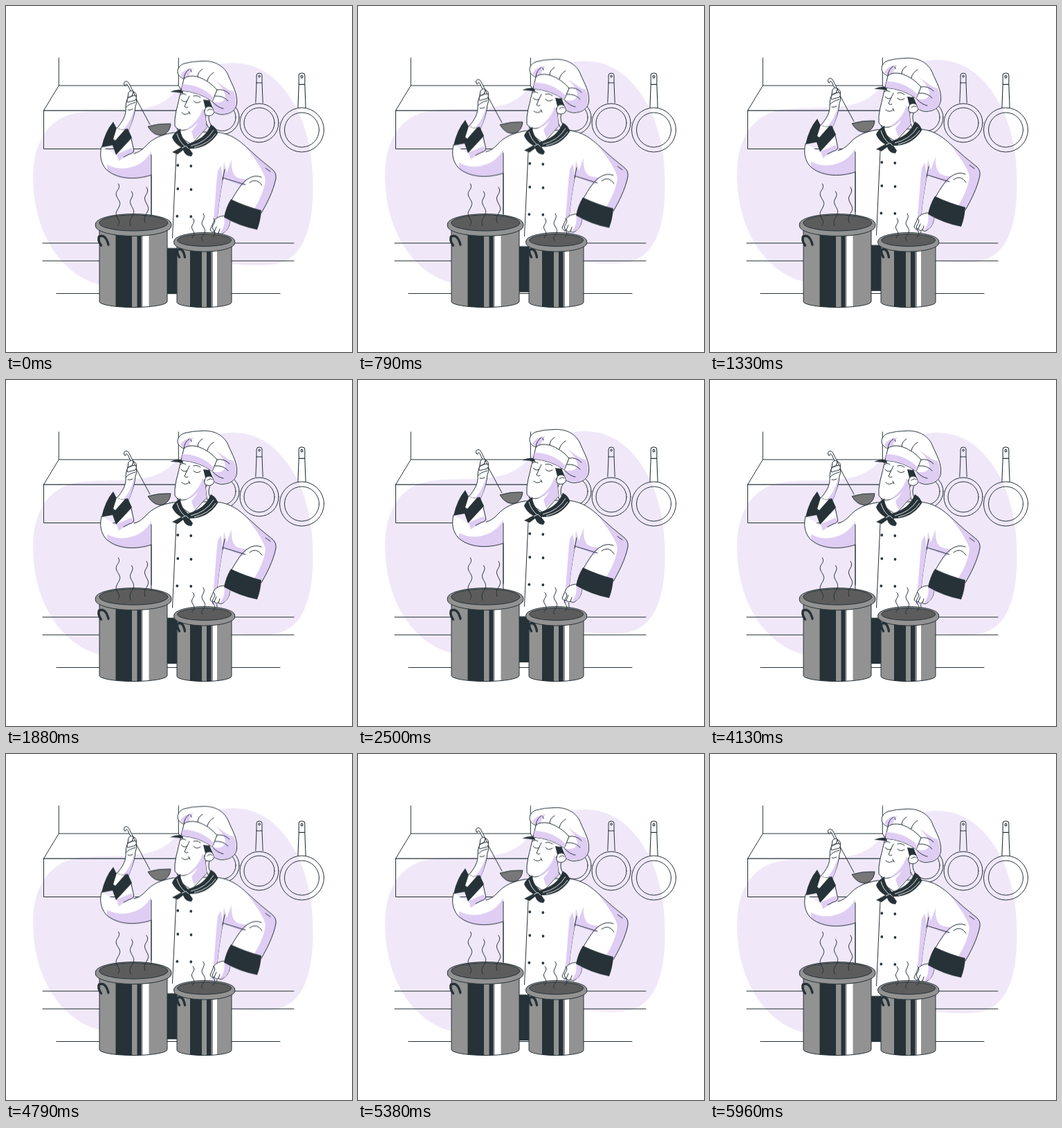
Recreate the animation shown at these times as an HTML page without scripts. Size 500x500 px, loop 6000 ms.

```html
<!DOCTYPE html>
<html lang="en">
<head>
<meta charset="utf-8">
<title>Chef tasting soup</title>
<style>
  html, body { margin: 0; width: 100%; height: 100%; overflow: hidden; background: #fff; }
  svg { display: block; width: 100vw; height: 100vh; }
  .bob { animation: bob 3s linear infinite alternate; }
  @keyframes bob { from { transform: translateY(.2px); } to { transform: translateY(-9.6px); } }
  .ln { fill: none; stroke: #263238; stroke-width: 1; stroke-linecap: round; stroke-linejoin: round; }
  .wh { fill: #fff; stroke: #263238; stroke-width: 1; stroke-linecap: round; stroke-linejoin: round; }
  .dk { fill: #263238; }
  .sh { fill: #dfcdf4; }
  .blob { fill: #f0e8f9; }
  .steel { fill: #929292; stroke: #263238; }
  .soup { fill: #5c5c5c; stroke: #263238; }
  .grip { fill: none; stroke: #263238; stroke-width: 3.4; stroke-linecap: round; }
  .trim { fill: none; stroke: #fff; stroke-width: .9; }
</style>
</head>
<body>
<svg viewBox="0 0 500 500">
  <defs>
    <clipPath id="big"><path d="M135 318V427A49 8.500 0 0 0 233 427V318Z"/></clipPath>
    <clipPath id="small"><path d="M247 342V428A39.500 7.500 0 0 0 326 428V342Z"/></clipPath>
    <g id="handle" class="ln">
      <path d="M-4 14V3Q-4 0 0 0T4 3V14L5.200 43M-4 14L-5.200 43M-4 14H4"/>
      <circle cy="4.500" r="1.400"/>
    </g>
    <circle id="button" class="dk" r="1.900"/>
  </defs>

  <g class="bob">
    <path class="blob" d="M328 82C375 82 404 116 421 150C437 182 444 222 443.500 262C443.500 325 428 369 384 373.500C345 378 318 366 284 378C240 394 190 408 146 404C94 399 39 342 39 246C39 205 55 171 87 158.500C124 145 176 158 217 143C245 132 250 112 274 98Q299 82 328 82Z"/>
  </g>

  <!-- kitchen -->
  <g class="ln">
    <path d="M53 342.700H416M53 368.300H416M73 415.500H396"/>
    <path d="M76.300 75V115H249.300V75M76.300 115L54.500 151M54.500 151V206.500H271V151L249.300 115"/>
    <path d="M54.500 151.200H271" stroke-width="1.300"/>
    <circle cx="312.500" cy="161" r="24.500"/><circle cx="312.500" cy="161" r="19.500"/>
    <circle cx="366" cy="169" r="28"/><circle cx="366" cy="169" r="22"/>
    <circle cx="427.500" cy="179" r="32"/><circle cx="427.500" cy="179" r="25"/>
  </g>
  <use href="#handle" x="366" y="97"/>
  <use href="#handle" transform="translate(427.500 97) scale(1.080 1.170)"/>

  <g class="bob">
    <!-- trousers and torso -->
    <path class="dk" d="M231 349H292V416H231Z"/>
    <path class="wh" d="M241 183C226 186 215 190 210 197V350H307C301 322 307 285 313 251L322 222L306 182Z"/>
    <path class="sh" d="M314 225L313 251C308 283 304 307 305 330H297C302 300 303 262 306 238Z"/>

    <!-- bent arm -->
    <path fill="#fff" d="M304 182C325 184 337 194 350 206Q367 222 385 236Q391 241 390 249C386 268 377 285 369 299L325 281C334 269 340 260 346 257L313 248Z"/>
    <path class="sh" d="M313 248L315 225L319 241L326 222Q325 241 333 247Q341 251 349 250L342 260Z"/>
    <path class="sh" d="M347 204Q367 222 385 236Q391 241 390 249C386 268 377 285 369 299L358 294Q373 270 375 251Q373 237 347 204Z"/>
    <path class="ln" d="M304 182C325 184 337 194 350 206Q367 222 385 236Q391 241 390 249C386 268 377 285 369 299"/>
    <path class="ln" d="M313 248L346 258M326 280C334 266 341 255 349 250Q359 243 369 247M352 255Q362 247 370 259M313 251L316 236M375 234L382 239"/>
    <path class="wh" d="M317 303C307 303 301 307 299 314L295 323Q297 328 301 326Q303 330 307 328Q311 331 315 327C321 323 323 317 324 309Z"/>
    <path class="sh" d="M315 303L324 308Q323 322 315 327L309 328Q318 318 315 303Z"/>
    <path class="ln" d="M301 326L304 319M307 328L309 322"/>
    <path class="dk" d="M325 279Q346 289 369 295Q368 310 363 323Q337 318 315 305Q318 290 325 279Z"/>

    <!-- raised arm -->
    <path fill="#fff" d="M241 183C224 186 212 191 202 202Q194 211 186 213L180 195L157 214L138 203C135 216 137 226 144 235C159 250 186 252 211 244Z"/>
    <path class="sh" d="M146 229Q166 239 186 231Q201 226 210 210V244C186 252 159 250 146 237Z"/>
    <path class="sh" d="M160 214L181 205L187 211Q173 216 163 224Z"/>
    <path class="ln" d="M241 183C224 186 212 191 202 202Q194 211 185 213M138 203C135 216 137 226 144 235C159 250 186 252 210 244M210 215V302M181 191L184 205Q187 212 178 214L170 218"/>
    <path class="wh" d="M159 178C169 166 174 158 173 146Q173 139 176 132L178 124Q182 120 185 124Q190 126 188 134Q190 139 187 145C186 158 181 170 176 182Z"/>
    <path class="sh" d="M186 146Q185 163 176 182L168 180Q180 168 186 146Z"/>
    <path class="dk" d="M155 167L159 175Q165 180 176 177L182 190L159 215L154 201L138 204Q143 181 155 167Z"/>
    <path fill="#fff" d="M160 176Q166 180 172 178L158 194L155 192Z"/>

    <!-- ladle -->
    <path class="ln" d="M186 130L208 171"/>
    <path class="wh" d="M171 114Q169 109 174 108.500Q177 109 178 112L187 130L184 131L176 114Q174 111 173 114Q173 117 171 114Z"/>
    <path d="M205 174Q221 169 238 170Q237 182 227 186Q214 189 205 174Z" fill="#777" stroke="#263238"/>
    <path class="wh" d="M175 138Q174 132 181 130L187 129Q190 132 187 136L179 138Q176 140 175 138ZM176 132L177 125Q181 120 184 124L182 130Z"/>
    <path class="ln" d="M174 146Q176 142 187 139M176 150Q179 151 183 149"/>

    <!-- neck and head -->
    <path class="wh" d="M246 174L253 190L268 200L290 176L287 150L262 150Z"/>
    <path class="sh" d="M268 181Q281 166 285 152L288 158L290 176L272 193Z"/>
    <path class="wh" d="M253 123C250 133 249 140 246 151Q243 164 244 173Q249 181 259 179C273 174 282 164 287 151L298 133L277 116Z"/>
    <path class="sh" d="M287 151L284 148Q279 166 259 179C273 175 283 164 287 153Z"/>
    <path class="dk" d="M285 135L300 137L302 146Q298 152 293 148L288 147Z"/>
    <path class="wh" d="M287 151Q288 144 295 145Q302 147 301 153Q298 160 290 158Q286 157 287 151Z"/>
    <path class="ln" d="M291 151Q295 147 298 150M253 135Q257 140 262 137M271 137Q275 142 281 138M252 128Q256 125 260 128M271 130Q276 128 281 132M265 130Q261 138 258 145Q260 148 263 146M254 154Q259 159 265 154M264 152L266 156"/>
    <path class="dk" d="M237 124Q246 119.500 255 121L256 126Q247 124 237 124Z"/>

    <!-- hat -->
    <path class="wh" d="M257 105C245 101 245 88 257 83Q269 79.500 283 79.500C303 78 317 88 322 102C327 114 335 126 333.500 141C332 150 325 155 317 156Q309 158 301 153L292 132Z"/>
    <path class="sh" d="M303 108C314 115 321 122 329 123Q335 137 331 147Q321 160 301 153L297 137Q310 143 317 133Q318 122 303 108ZM252 100Q256 91 271 89Q265 95 264 103L257 105Z"/>
    <path class="wh" d="M253 122L257 105Q263 99 277 102Q294 108 305 121L298 138Q280 124 253 122Z"/>
    <path class="sh" d="M254 119L255 113Q281 113 300 132L298 138Q280 124 254 122Z"/>
    <path class="ln" d="M257 105Q258 95 265 91M277 102Q277 95 284 91M291 108Q292 101 300 96M305 121Q315 119 323 127M302 130Q314 129 321 137M299 139Q307 147 314 148M267 92L268 95"/>

    <!-- scarf -->
    <path class="dk" d="M252 177Q242 183 240 190Q244 199 253 204L240 211L248 214L256 208Q259 217 268 217L270 213L265 206C283 206 296 199 306 184Q305 176 296 171C290 187 278 194 263 199Q252 189 252 177Z"/>
    <path class="trim" d="M247 184Q250 195 258 202M267 202Q289 197 300 179M272 204Q293 199 303 184M254 205L260 202L264 206"/>

    <!-- coat front -->
    <path class="ln" d="M246 213L240.500 335"/>
    <use href="#button" x="248.300" y="230"/><use href="#button" x="267.300" y="231"/>
    <use href="#button" x="248.300" y="264"/><use href="#button" x="267.500" y="265"/>
    <use href="#button" x="247.300" y="303.500"/><use href="#button" x="267.300" y="304"/>
  </g>

  <!-- large pot -->
  <g clip-path="url(#big)">
    <path d="M135 310H233V440H135Z" fill="#929292"/>
    <path class="dk" d="M158.500 310H182V440H158.500ZM189.500 310H195.500V440H189.500Z"/>
    <path d="M197.500 310H206.500V440H197.500Z" fill="#fff"/>
  </g>
  <path class="ln" d="M135 318V427A49 8.500 0 0 0 233 427V318"/>
  <path class="steel" d="M129.300 315A54.800 14.500 0 0 1 238.900 315V318A54.800 14.500 0 0 1 129.300 318Z"/>
  <ellipse class="soup" cx="184.300" cy="313.500" rx="49.500" ry="11.500"/>
  <path class="grip" d="M137.500 346Q132 338 134.500 333Q144 329 148 345"/>

  <!-- small pot -->
  <g clip-path="url(#small)">
    <path d="M247 335H326V440H247Z" fill="#929292"/>
    <path class="dk" d="M266 335H283V440H266ZM290 335H296.500V440H290Z"/>
    <path d="M299 335H305V440H299Z" fill="#fff"/>
  </g>
  <path class="ln" d="M247 342V428A39.500 7.500 0 0 0 326 428V342"/>
  <path class="steel" d="M242.700 340A44 12.500 0 0 1 330.700 340V342.500A44 12.500 0 0 1 242.700 342.500Z"/>
  <ellipse class="soup" cx="286.700" cy="338.500" rx="39" ry="8.800"/>
  <path class="grip" d="M250.500 363Q246 355 248.500 352Q256 349 258.500 363"/>

  <!-- steam -->
  <g class="ln">
    <path d="M162.500 257C167 264 157 267 159.500 274S167 283 163.500 290S157 299 161 306S164 312 162 317"/>
    <path d="M181.500 268C187 275 177 279 180 286S187 296 183 303S178 310 180 318"/>
    <path d="M203 262C209 270 198 273 201 281S208 291 204 298S199 306 201 313"/>
    <path d="M270 307C276 313 266 316 269 322S274 328 269 335"/>
    <path d="M285 300C290 307 280 311 284 317S289 326 285 331S283 336 284 339"/>
    <path d="M300 307C306 313 296 316 299 322S304 328 299 334"/>
  </g>
</svg>
</body>
</html>
```
